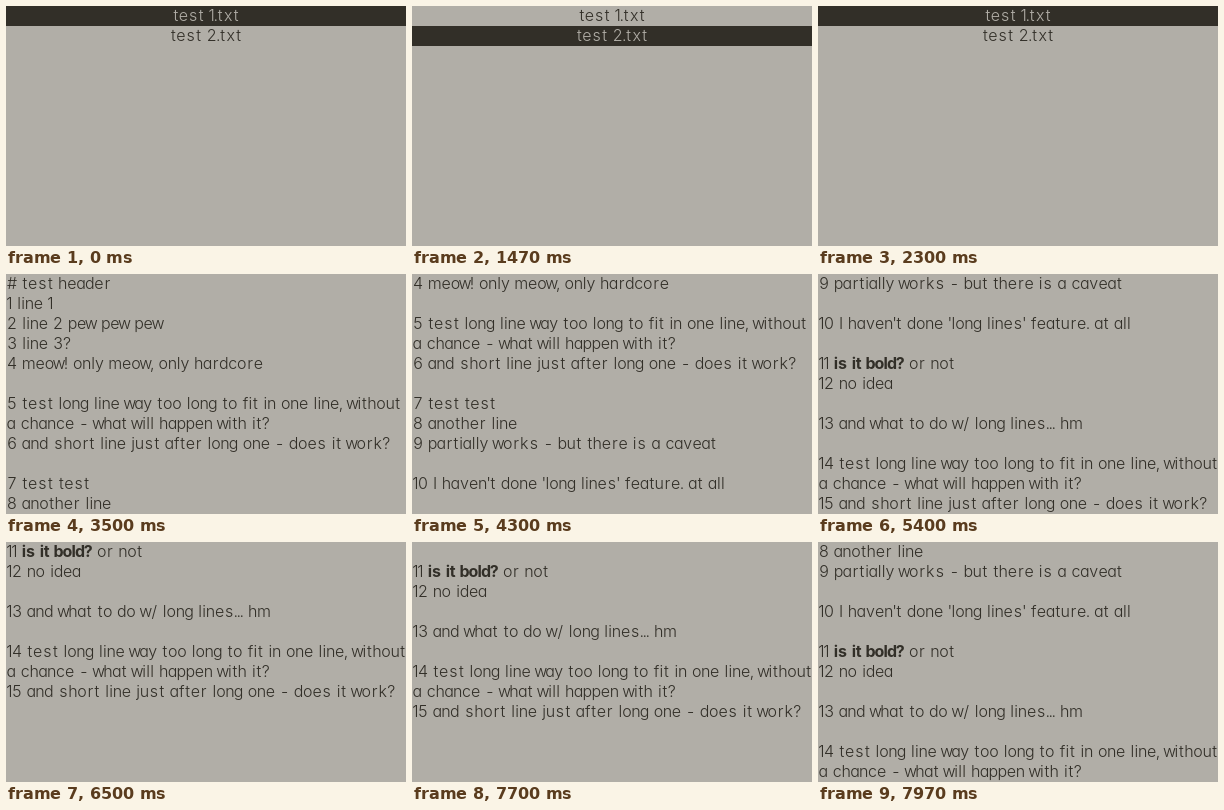
Write an HTML page that moves like this. It is 400 by 240 pixels and loops after 8 s.

```html
<!DOCTYPE html>
<html lang="en">
<head>
<meta charset="utf-8">
<title>Text reader</title>
<style>
  html, body { margin: 0; width: 100%; height: 100%; overflow: hidden; background: #b1aea7; }
  svg { display: block; width: 100%; height: 100%; }
  text {
    font: 300 16px Inter, "Open Sans", sans-serif;
    font-feature-settings: "cv11"; /* single-storey a */
    fill: #322f28;
    text-anchor: middle;
    white-space: pre;
  }
  .bold { font-weight: 700; }
  .picked { fill: #b1aea7; }
</style>
</head>
<body>
<svg viewBox="0 0 400 240">
  <rect width="400" height="240" fill="#b1aea7"/>
  <g id="menu"><rect id="bar" width="400" height="20" fill="#322f28"/></g>
  <g id="page"></g>
</svg>
<script>
const LOOP = 8000, ROW = 20, OPEN_AT = 3500;

const files = ["test 1.txt", "test 2.txt"];
const lines = [
  "# test header",
  "1 line 1",
  "2 line 2 pew pew pew",
  "3 line 3?",
  "4 meow! only meow, only hardcore",
  "",
  "5 test long line way too long to fit in one line, without",
  "a chance - what will happen with it?",
  "6 and short line just after long one - does it work?",
  "",
  "7 test test",
  "8 another line",
  "9 partially works - but there is a caveat",
  "",
  "10 I haven't done 'long lines' feature. at all",
  "",
  "11 *is it bold?* or not",
  "12 no idea",
  "",
  "13 and what to do w/ long lines... hm",
  "",
  "14 test long line way too long to fit in one line, without",
  "a chance - what will happen with it?",
  "15 and short line just after long one - does it work?"
];

// Scrolling goes in whole rows, in even steps between two times.
const moves = [
  { start: 4100, end: 4300, steps: 4, from: 0, to: 4 },
  { start: 5000, end: 5400, steps: 7, from: 4, to: 12 },
  { start: 6300, end: 6500, steps: 4, from: 12, to: 16 },
  { start: 7700, end: 7970, steps: 5, from: 16, to: 11 }
];

// Letter pitch of the handheld's font; anything else is 9 wide.
const pitches = [
  ["'.,", 3], ["il!Ij", 4], [" 1", 5], ["ft", 6], ["/", 7], ["r", 7.3],
  ["?", 8], ["gy", 8.5], ["an", 8.7], ["evo", 9.3],
  ["023456789#swx", 10], ["m", 13.5]
];

function pitch(char) {
  const group = pitches.find(([chars]) => chars.includes(char));
  return group ? group[1] : 9;
}

const byId = id => document.getElementById(id);
const widthOf = str => [...str].reduce((sum, char) => sum + pitch(char), 0);

function addText(parent, str, left, top, bold) {
  const node = document.createElementNS("http://www.w3.org/2000/svg", "text");
  const centres = [];
  for (const char of str) {
    const advance = pitch(char) - (bold ? 0.3 : 0);
    centres.push((left + advance / 2).toFixed(2));
    left += advance;
  }
  node.setAttribute("x", centres.join(" "));
  node.setAttribute("y", top + 15);
  if (bold) node.setAttribute("class", "bold");
  node.textContent = str;
  parent.append(node);
  return { node, right: left };
}

const menu = byId("menu"), page = byId("page"), bar = byId("bar");

const items = files.map((name, i) =>
  addText(menu, name, 200 - widthOf(name) / 2, i * ROW).node);

lines.forEach((line, row) => {
  let x = 1;
  line.split("*").forEach((part, i) => {
    if (part) x = addText(page, part, x, row * ROW, i % 2 === 1).right;
  });
});

function topRow(t) {
  let row = 0;
  for (const { start, end, steps, from, to } of moves) {
    if (t < start) break;
    const gap = (end - start) / (steps - 1);
    const step = Math.min(steps, Math.floor((t - start) / gap + 0.001) + 1);
    row = from + Math.round((to - from) * step / steps);
  }
  return row;
}

function draw(t) {
  const reading = t >= OPEN_AT;
  menu.style.display = reading ? "none" : "";
  page.style.display = reading ? "" : "none";
  const picked = t >= 1470 && t < 2300 ? 1 : 0;
  bar.setAttribute("y", picked * ROW);
  items.forEach((item, i) => item.classList.toggle("picked", i === picked));
  page.setAttribute("transform", `translate(0 ${-topRow(t) * ROW})`);
}

function tick() {
  draw(performance.now() % LOOP);
  requestAnimationFrame(tick);
}
tick();
</script>
</body>
</html>
```
